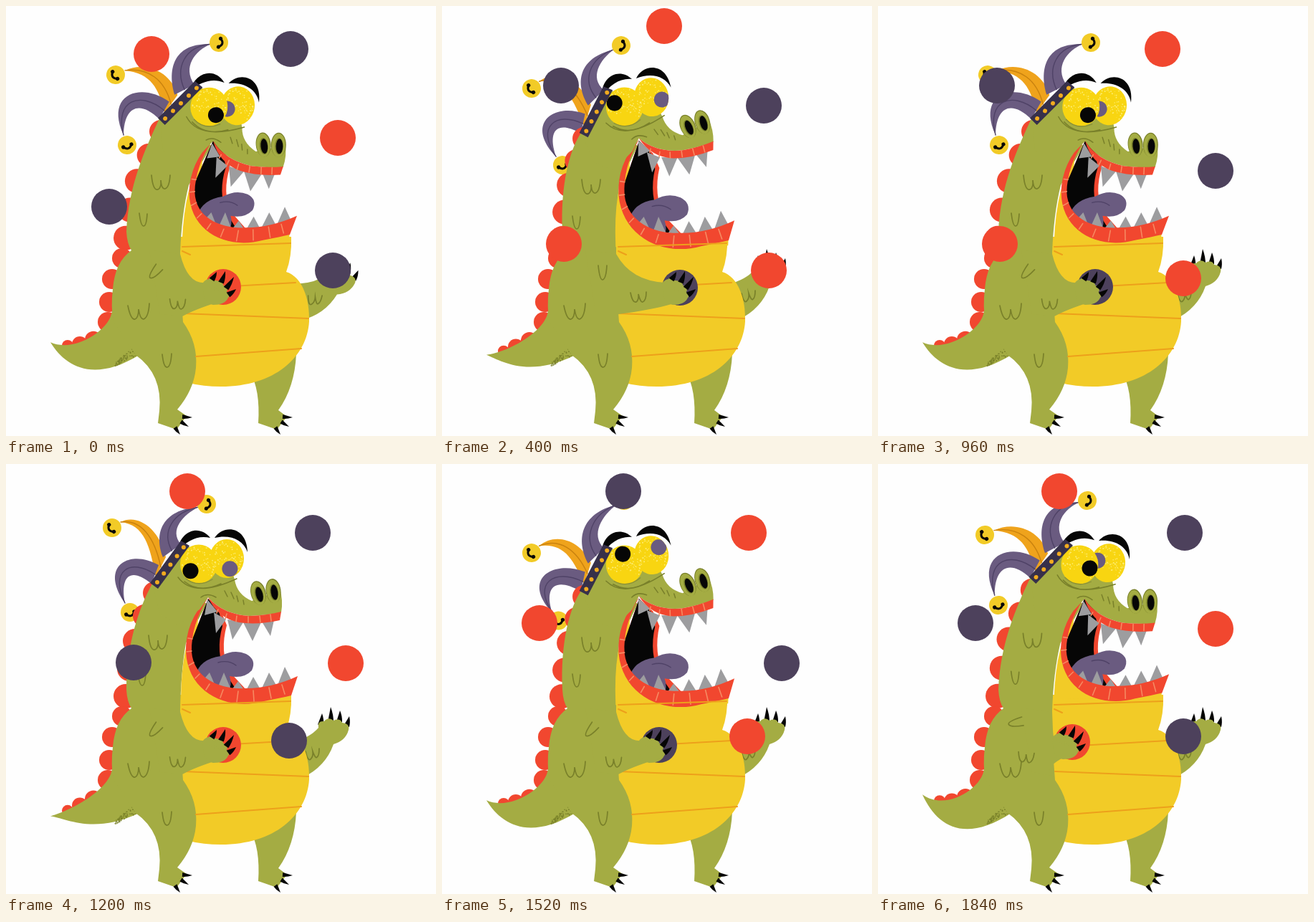
Recreate the animation shown at these times as an HTML page with a canvas. Size 600 px wide and 600 px high, loop 1920 ms.

```html
<!DOCTYPE html>
<html lang="en">
<head>
<meta charset="utf-8">
<title>Juggling crocodile</title>
<style>
html, body { margin: 0; width: 100%; height: 100%; overflow: hidden; background: #fefefe; }
canvas { display: block; }
</style>
</head>
<body>
<canvas id="stage" width="600" height="600"></canvas>
<script>
const c = document.getElementById('stage').getContext('2d');
const GREEN = '#a4ac43', OLIVE = '#79802a', YELLOW = '#f2cb27', ORANGE = '#eda01b', RED = '#f1472f',
  DARK = '#4d415c', PURPLE = '#6a5b80', GRAY = '#9d9d9f', INK = '#060606';
const STEP = 80, STEPS = 24, RAD = Math.PI / 180, PIVOT = [268.5, 233];

const fill = (d, color) => { c.fillStyle = color; c.fill(new Path2D(d)); };
const line = (d, color = OLIVE, w = 1.7) => {
  c.strokeStyle = color; c.lineWidth = w; c.lineCap = 'round'; c.stroke(new Path2D(d));
};
const oval = (x, y, rx, ry, color, turn = 0) => {
  c.fillStyle = color; c.beginPath(); c.ellipse(x, y, rx, ry, turn * RAD, 0, 7); c.fill();
};
const disc = (x, y, r, color) => oval(x, y, r, r, color);
const group = (draw, x, y, deg = 0) => {
  c.save(); c.translate(x, y); c.rotate(deg * RAD); draw(); c.restore();
};
const turned = (deg, [x, y], draw) => group(() => { c.translate(-x, -y); draw(); }, x, y, deg);

// Curved triangle from a base centre to a tip
function claw(x, y, tx, ty, w = 4) {
  const len = Math.hypot(tx - x, ty - y), nx = -(ty - y) / len * w, ny = (tx - x) / len * w;
  const mx = (x + tx) / 2 + nx, my = (y + ty) / 2 + ny;
  fill(`M${x + nx} ${y + ny}Q${mx} ${my} ${tx} ${ty}L${x - nx} ${y - ny}Z`, INK);
}

function tooth(x1, y1, tx, ty, x2, y2) {
  fill(`M${x1} ${y1}L${tx} ${ty}L${x2} ${y2}Z`, GRAY);
}

let seed = 7;
const random = () => (seed = seed * 16807 % 2147483647) / 2147483647;
const specks = Array.from({ length: 110 }, () => {
  const a = random() * 7, r = Math.sqrt(random());
  return [Math.cos(a) * r, Math.sin(a) * r, .4 + random() * .7];
});
const shade = Array.from({ length: 90 }, () => [random(), random()]);

// Ball route, one point per step, counter-clockwise from the far hand
const route = [
  [456, 369], [470, 324], [474, 278], [471, 230], [463, 184], [449, 139], [428, 96], [397, 60],
  [357, 36], [310, 28], [253, 38], [203, 67], [166, 111], [145, 165], [136, 222], [144, 280],
  [170, 332], [222, 368], [271, 388], [303, 392], [332, 393], [364, 391], [395, 386], [426, 380]];
const innerFall = { 13: [185, 175], 14: [185, 226], 15: [178, 277] };
const starts = [0, 4, 7, 11, 15, 19];
const catches = starts.map(s => (18 - s + STEPS) % STEPS);

function balls(n, held) {
  starts.forEach((start, i) => {
    const at = (start + n) % STEPS;
    if ((at > 17 && at < 21) !== held) return;
    const [x, y] = i < 2 && innerFall[at] || route[at];
    disc(x, y, 25, i % 2 ? RED : DARK);
  });
}

function handX(n) {
  const since = Math.min(...catches.map(k => (n - k + STEPS) % STEPS));
  const until = Math.min(...catches.map(k => (k - n + STEPS) % STEPS));
  return since < 3 ? [262, 293, 326][since] : until === 1 ? 293 : 312;
}

// Bell centres: left, top, bottom
const fwd = [153, 96, 297, 51, 169, 194], near = [149, 99, 292, 51, 168, 197],
  mid = [148, 89, 280, 56, 173, 207], ret = [131, 118, 265, 49, 162, 212],
  back = [125, 115, 250, 55, 168, 222], low = [119, 130, 243, 53, 163, 225];
const bellKeys = [[0, fwd], [3, mid], [5, back], [9, ret], [11, near], [12, fwd],
  [15, mid], [17, low], [21, ret], [23, near], [24, fwd]];

function bells(n) {
  const i = bellKeys.findIndex(k => k[0] > n), [n0, a] = bellKeys[i - 1], [n1, b] = bellKeys[i];
  return a.map((v, j) => v + (b[j] - v) * (n - n0) / (n1 - n0));
}

// Horn outline: base, two controls, tip, two controls, base
const horns = [
  { at: 0, color: '#efa31c', vein: '#c9820f', face: 145, p: [223, 130, 208, 100, 170, 92, 143, 110, 180, 108, 195, 125, 209, 158] },
  { at: 2, color: PURPLE, vein: '#4f4266', face: 15, p: [219, 130, 201, 95, 205, 58, 254, 53, 235, 65, 222, 90, 244, 112] },
  { at: 4, color: PURPLE, vein: '#4f4266', face: 70, p: [213, 141, 170, 120, 120, 145, 155, 199, 150, 160, 170, 145, 203, 167] }];

function hat(n, tilt) {
  const pos = bells(n), cos = Math.cos(tilt * RAD), sin = Math.sin(tilt * RAD);
  for (const { at, color, vein, face, p } of horns) {
    const x = pos[at] - PIVOT[0], y = pos[at + 1] - PIVOT[1];
    const bx = PIVOT[0] + x * cos + y * sin, by = PIVOT[1] - x * sin + y * cos;
    const d = [bx - ret[at], by - ret[at + 1]], pull = [0, .35, .8, 1, .8, .35, 0];
    const q = p.map((v, i) => v + d[i % 2] * pull[i >> 1]);
    const half = (i, j) => `${(q[i] + q[j]) / 2} ${(q[i + 1] + q[j + 1]) / 2} `;
    fill(`M${q[0]} ${q[1]}C${q.slice(2, 8).join(' ')}C${q.slice(8).join(' ')}Z`, color);
    line(`M${half(0, 12)}C${half(2, 10)}${half(4, 8)}${q[6]} ${q[7]}`, vein, 1.4);
    disc(bx, by, 13, YELLOW);
    group(() => {
      line('M1 -6Q9 0 1 6', INK, 3);
      disc(1, -6, 2.6, INK); disc(1, 6, 2.6, INK);
    }, bx, by, face - tilt);
  }
}

function farSide(n) {
  fill('M340 510Q355 535 352 582L378 591L392 573L380 564Q403 532 405 485Z', GREEN);
  claw(386, 573, 400, 574, 3); claw(384, 580, 395, 587, 3); claw(376, 588, 383, 598, 3);
  turned(n ? 0 : 12, [405, 420], () => {
    claw(439, 364, 441, 348); claw(453, 360, 453, 339); claw(465, 360, 466, 344); claw(475, 366, 479, 352);
    fill('M400 388Q424 382 436 368Q434 358 444 359Q450 352 457 358Q466 354 469 361Q480 362 478 371Q474 386 457 391Q446 422 415 437Z', GREEN);
    line('M418 401q3 14 7 11q4-4 3-11q4 11 6 8q3-2 3-12');
  });
}

function tail(n, bend) {
  const tip = 474 + 18 * Math.sin((n - .5) * 30 * RAD), d = tip - 474;
  const spikes = [[207, 180, 16], [193, 212, 16], [180, 247, 17], [172, 286, 17], [167, 324, 17], [162, 352, 14],
    [148, 381, 14], [144, 413, 14], [142, 441, 14]];
  for (const [x, y, r] of spikes) {
    const k = Math.max(0, (335 - y) / 155);
    disc(x - 9 * bend * k * k, y + 5 * bend * k, r, RED);
  }
  disc(122, 466 + d * .08, 12, RED); disc(103, 473 + d * .2, 11, RED); disc(86, 476 + d * .45, 8, RED);
  fill(`M148 425C146 452 95 ${484 - d * .1} 62 ${tip}C82 ${500 - d * .4} 120 ${525 - d * .4} 186 487L190 430Z`, GREEN);
  for (const [u, v] of shade) disc(184 - 32 * u, 487 + 16 * u - v * 17 * (1 - u * .7), .8, OLIVE);
}

function belly() {
  fill('M240 322L398 322Q399 350 391 371C414 378 424 410 423 440C420 490 375 531 300 531Q275 531 255 526L240 440Z', YELLOW);
}

function body(bend) {
  const s = bend;
  fill(`M${204 - 10 * s} ${167 + 10 * s}C${186 - 8 * s} 200 ${168 - 3 * s} 250 168 315Q169 332 175 341
    Q152 357 149 395Q146 420 150 440L181 487Q219 514 214 565L212 582L238 591L252 572L239 563
    Q262 536 265 505Q268 470 247 441L244 400L243 345Q${244 - s} 290 ${251 - 4 * s} 250
    L${280 - 7 * s} 195L${240 - 8 * s} 170Z`, GREEN);
  claw(246, 573, 260, 574, 3); claw(244, 580, 255, 587, 3); claw(236, 588, 243, 598, 3);
  group(() => line('M199 239q2 22 9 20q5-2 4-13q1 13 6 12q6-2 7-19'), -4 * s, 3 * s);
  group(() => line('M184 291q2 18 6 18q4 0 5-17'), -2 * s, 2 * s);
  line('M170 418q4 20 10 19q5-2 5-14q2 14 7 14q7-3 8-22M218 486q2 19 7 18q5-1 6-19');
}

function jaw(bend) {
  c.save();
  c.transform(1 + .0264 * bend, 0, .0432 * bend, 1 + .03 * bend, -22.5 * bend, -5.7 * bend);
  fill('M268 215Q244 250 244 332L397 330L398 318L330 325L265 290Z', YELLOW);
  fill('M282 188L300 205L308 225Q298 262 312 290L336 316L290 316Q256 290 256 255Z', RED);
  fill('M282 188L297 205L302 226Q292 262 306 292L322 316L290 316Q256 290 256 255Z', INK);
  fill('M264 296Q270 272 300 268Q318 258 335 265Q350 273 343 288Q332 300 312 296Q316 308 310 318L280 316Z', PURPLE);
  line('M296 277Q310 273 321 281', '#4f4266', 1.4);
  [[273, 304, 284, 291, 294, 314], [295, 313, 304, 291, 315, 317], [314, 316, 324, 303, 334, 318],
   [335, 316, 345, 297, 356, 316], [356, 315, 367, 291, 379, 312], [378, 311, 389, 283, 399, 303]]
    .forEach(t => tooth(...t));
  fill('M282 186Q250 220 251 262C254 320 310 345 360 331Q385 326 398 323L407 296Q370 313 335 313C300 315 262 300 259 262Q258 225 282 186Z', RED);
  line('M254 243l6 1M252 262l7-1M255 281l7-4M264 299l6-6M279 315l5-8M299 326l4-11M322 332l2-15M346 331l-1-15M370 327l-3-15M389 321l-4-13', '#f68a62', 1.6);
  c.restore();
  line('M246 336L397 331M246 342L257 347M245 395L404 386M247 429L422 436M265 489L412 478', ORANGE, 2);
}

function eye(x, y, rx, angle, r, color) {
  oval(x, y, rx, 27, '#f8d511');
  for (const [u, v, size] of specks) if (v - u * .3 < .45) disc(x + u * rx * .95, y + v * 25.5, size, '#fdec72');
  c.save();
  c.beginPath(); c.ellipse(x, y, rx, 27, 0, 0, 7); c.clip();
  disc(x + r * Math.cos(angle * RAD), y + r * Math.sin(angle * RAD), 11, color);
  c.restore();
}

function head(n, tilt) {
  [[281, 189, 277, 211, 295, 206], [290, 207, 293, 236, 307, 217], [309, 217, 316, 245, 331, 221],
   [331, 221, 344, 247, 356, 221], [357, 220, 369, 240, 374, 218]].forEach(t => tooth(...t));
  fill(`M204 167L246 112L310 135L319 161Q322 182 343 191L362 184L382 174Q387 190 384 207
    Q365 211 340 212Q303 210 282 186L270 203L240 225L215 210Z`, GREEN);
  fill('M282 186Q303 210 340 212Q365 211 384 206L382 218Q350 225 325 221Q295 215 282 186Z', RED);
  line('M296 203l-2 5M308 209l-2 7M322 212l-1 8M338 213l0 8M354 212l1 9M369 210l1 9', '#f68a62', 1.6);

  for (const [x, y, turn] of [[373, 177, -8], [352, 180, -14]]) {
    oval(x, y, 10.5, 17, OLIVE, turn); oval(x, y + .8, 9.5, 16.5, GREEN, turn);
    oval(x + 1, y + 2, 6, 11.5, OLIVE, turn); oval(x + 1.5, y + 2, 4.8, 10.5, INK, turn);
  }
  line('M240 158Q262 188 322 160M249 164Q270 181 300 167M272 186Q281 179 293 186M305 177l4 8M314 179l4 9M322 184l2 8M331 190l1 6', OLIVE, 1.5);

  const turn = n * 30;
  eye(308, 132, 24, 163 - turn - tilt, 15, PURPLE);
  eye(269, 139.5, 26, 50 + turn - tilt, 15, INK);
  line('M251 160Q268 173 288 161', '#8b9136', 1.3);
  fill('M239 122C243 92 270 84 285 103C268 99 253 106 239 122Z', INK);
  fill('M291 103C303 84 336 86 337 123C331 105 312 98 291 103Z', INK);

  fill('M201 166L244 107L256 114L212 174Z', '#37304a');
  for (let i = 0; i < 5; i++) disc(211 + 9.2 * i, 165 - 12.2 * i, 3, '#f2ab1f');
}

function arm(x) {
  const k = (x - 262) / 64, lift = k < .2 ? -5 : 0;
  fill(`M200 340L243 346Q${244 + 20 * k} ${394 - 10 * k} ${x - 14} ${386 + lift}L${x + 4} ${402 + lift}L${x - 6} ${416 + lift}
    Q${x - 34} ${424 + 3 * (1 - k)} 246 ${436 - 6 * k}L215 430Z`, GREEN);
  group(() => {
    fill('M-18-12Q-12-20-2-15Q7-16 9-9Q15-7 14 0Q20 4 17 9Q13 19-4 19Q-20 17-18-12Z', GREEN);
    fill('M-14-8L-9-19L0-14L-2 0ZM-2-6L5-15L10-10L6 2ZM4 0L13-8L16-1L8 8ZM6 6L15 2L18 8L8 14Z', GREEN);
    claw(-6, -16, 1, -27); claw(7, -12, 13, -28); claw(14, -4, 25, -20); claw(17, 5, 28, -3);
  }, x, 398 + lift);
  group(() => line('M-6-10q2 20 6 20q5-1 6-20'), 192 + 32 * k, 361 + 11 * Math.min(1, k * 2), 78 * (1 - k));
  group(() => line('M-11-7q3 15 8 13q4-3 3-11q3 12 6 11q5-2 5-14'), 206 + 68 * k, 410 + 32 * k * (1 - k) - 3 * k, 8 * (1 - k));
}

function draw() {
  const n = Math.floor(performance.now() / STEP) % STEPS;
  const swing = Math.cos(n * 30 * RAD), tilt = swing * (swing > 0 ? 8.8 : 10.1), bend = -tilt / 8.8;
  c.fillStyle = '#fefefe';
  c.fillRect(0, 0, 600, 600);
  farSide(n);
  turned(tilt, PIVOT, () => hat(n, tilt));
  tail(n, bend);
  belly();
  body(bend);
  jaw(bend);
  turned(tilt, PIVOT, () => head(n, tilt));
  balls(n, true);
  arm(handX(n));
  balls(n, false);
  requestAnimationFrame(draw);
}
draw();
</script>
</body>
</html>
```
